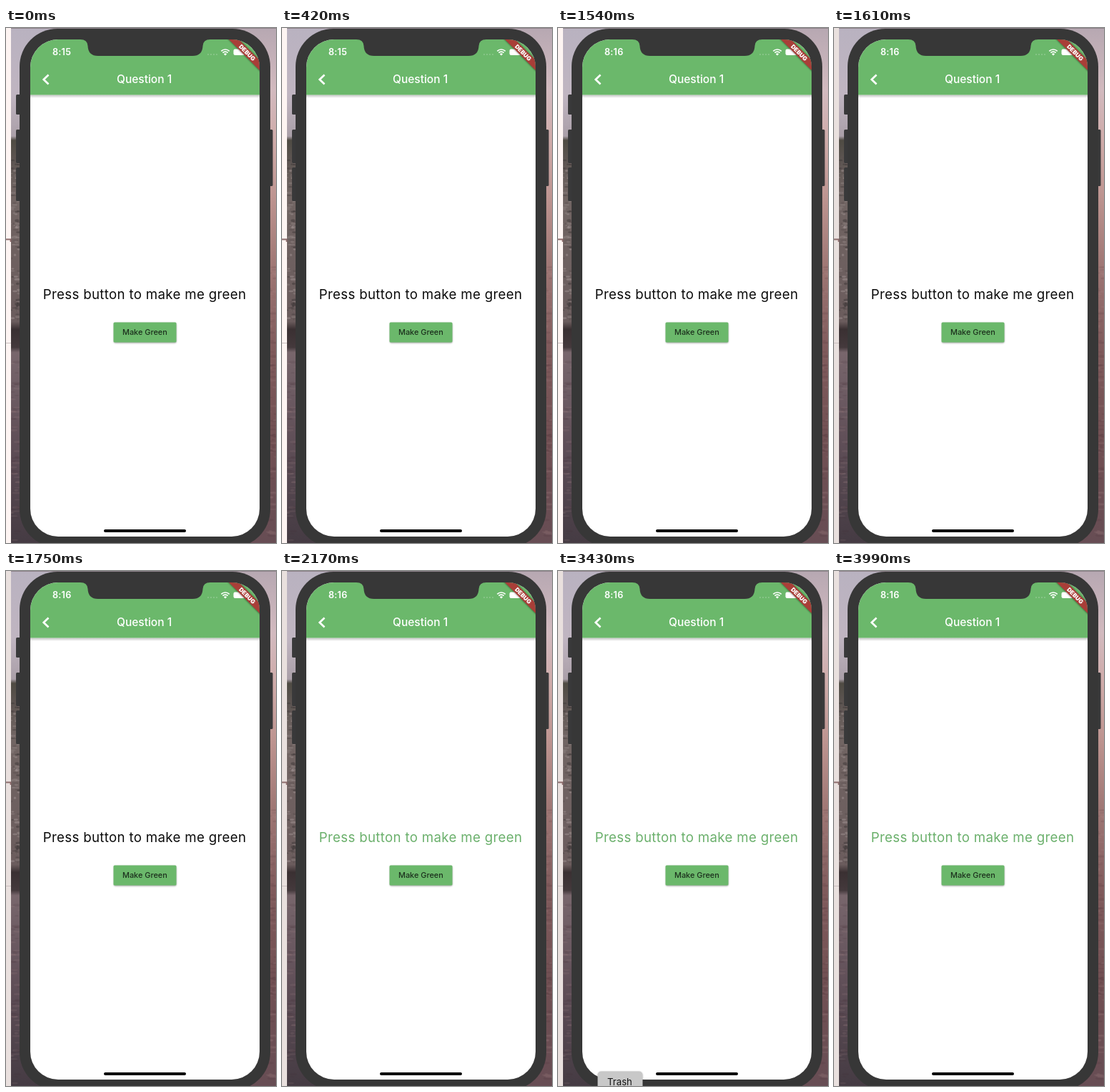
Write an HTML page that moves like this. It is 378 px wide and 720 px high and loops after 4060 ms.

```html
<!DOCTYPE html>
<html lang="en">
<head>
<meta charset="utf-8">
<title>Question 1</title>
<style>
html, body { margin: 0; width: 100%; height: 100%; overflow: hidden; background: #383838; }
svg { display: block; width: 378px; height: 720px; }
text { font-family: Inter, "Open Sans", sans-serif; }
</style>
</head>
<body>
<svg viewBox="0 0 378 720">
  <defs>
    <linearGradient id="leftSide" x2="0" y2="1">
      <stop offset="0" stop-color="#b9b2c0"/>
      <stop offset=".13" stop-color="#c0b5c1"/>
      <stop offset=".21" stop-color="#aa9fa8"/>
      <stop offset=".218" stop-color="#4f4b43"/>
      <stop offset=".25" stop-color="#5b5450"/>
      <stop offset=".32" stop-color="#716563"/>
      <stop offset=".57" stop-color="#6b5c5d"/>
      <stop offset=".585" stop-color="#3a3032"/>
      <stop offset=".62" stop-color="#44393c"/>
      <stop offset=".63" stop-color="#78666c"/>
      <stop offset=".8" stop-color="#604f58"/>
      <stop offset="1" stop-color="#453b43"/>
    </linearGradient>
    <linearGradient id="rightSide" x2="0" y2="1">
      <stop offset="0" stop-color="#b7a8b2"/>
      <stop offset=".12" stop-color="#d2babf"/>
      <stop offset=".22" stop-color="#cfaba9"/>
      <stop offset=".33" stop-color="#bd9490"/>
      <stop offset=".45" stop-color="#a27a77"/>
      <stop offset=".62" stop-color="#805b5c"/>
      <stop offset=".8" stop-color="#715053"/>
      <stop offset="1" stop-color="#674d54"/>
    </linearGradient>
    <linearGradient id="barShadow" x2="0" y2="1">
      <stop offset="0" stop-color="#000" stop-opacity=".24"/>
      <stop offset="1" stop-color="#000" stop-opacity="0"/>
    </linearGradient>
    <filter id="soft" x="-20%" y="-40%" width="140%" height="180%">
      <feGaussianBlur stdDeviation=".9"/>
    </filter>
    <clipPath id="screen"><rect x="34" y="16" width="321" height="695" rx="39"/></clipPath>
  </defs>

  <!-- desktop -->
  <rect width="200" height="720" fill="url(#leftSide)"/>
  <rect x="200" width="178" height="720" fill="url(#rightSide)"/>
  <g id="texture"></g>
  <rect width="378" height="1" fill="#8e828a"/>
  <rect id="panel" width="7" height="720"/>
  <path d="M0 295.5H6.5V299" fill="none" stroke="#8d6c6c" stroke-width="1.8"/>
  <path d="M0 440.5H7" stroke="#c9bfbf"/>

  <!-- phone -->
  <g fill="#39393a">
    <rect x="14" y="93" width="8" height="28" rx="1.5"/>
    <rect x="14" y="142" width="8" height="47" rx="1.5"/>
    <rect x="14" y="195" width="8" height="47" rx="1.5"/>
    <rect x="366" y="142" width="7.5" height="79" rx="1.5"/>
  </g>
  <rect x="19" y="1" width="351" height="725" rx="53" fill="#373737"/>
  <g clip-path="url(#screen)">
    <rect x="34" y="16" width="321" height="695" fill="#fff"/>
    <rect x="34" y="93.5" width="321" height="4.5" fill="url(#barShadow)"/>
    <rect x="34" y="16" width="321" height="77.5" fill="#6bb86b"/>
    <g fill="#fff">
      <text id="clock" x="65" y="38" font-size="12.7" font-weight="600" letter-spacing=".2"></text>
      <g opacity=".4">
        <circle cx="283" cy="37" r=".8"/><circle cx="287" cy="37" r=".8"/>
        <circle cx="291" cy="37" r=".8"/><circle cx="295" cy="37" r=".8"/>
      </g>
      <path d="M307 38.6L304.9 36.4A3 3 0 0 1 309.1 36.4Z"/>
      <rect x="318.5" y="29.5" width="16" height="8.5" rx="2.2"/>
    </g>
    <g fill="none" stroke="#fff" stroke-width="1.6">
      <path d="M303.4 34.6A5.1 5.1 0 0 1 310.6 34.6"/>
      <path d="M301.3 32.4A8.1 8.1 0 0 1 312.7 32.4"/>
      <path d="M59.5 65.5L52.7 72L59.5 78.5" stroke-width="2.7"/>
    </g>
    <text x="155" y="77" font-size="15.5" font-weight="500" fill="#fff">Question 1</text>
    <g transform="translate(355 16) rotate(45)">
      <rect x="-50" y="20.4" width="100" height="10.4" fill="#000" opacity=".5" filter="url(#soft)"/>
      <rect x="-50" y="20.4" width="100" height="10" fill="#a93e38"/>
      <text x="0.7" y="28.3" font-size="8.2" font-weight="900" text-anchor="middle" fill="#fff">DEBUG</text>
    </g>
    <text id="prompt" x="51.7" y="379" font-size="18.7" letter-spacing=".32">Press button to make me green</text>
    <rect x="151" y="412.5" width="87.5" height="28" rx="2" fill="#000" opacity=".36" filter="url(#soft)"/>
    <rect x="150.5" y="411.5" width="88" height="28" rx="1.5" fill="#6bb86b"/>
    <text x="163" y="429.3" font-size="10.9" font-weight="500" fill="#1c301d">Make Green</text>
    <rect x="137" y="701" width="115" height="4" rx="2"/>
  </g>
  <path d="M104 15H286V16Q276 16 275.5 25Q275 39 261 39H129Q115 39 114.5 25Q114 16 104 16Z" fill="#373737"/>

  <g id="tip">
    <rect x="55.5" y="700" width="63" height="30" rx="5" fill="#000" opacity=".25" filter="url(#soft)"/>
    <rect x="55.5" y="699.5" width="63" height="30" rx="5" fill="#c8c8c8"/>
    <text x="69" y="718.5" font-size="13.2" fill="#161616">Trash</text>
  </g>
</svg>
<script>
const LOOP = 4060;
const el = id => document.getElementById(id);

let seed = 7;
const rand = () => (seed = seed * 16807 % 2147483647) / 2147483647;

// Scatters flat blobs over a strip of the desktop.
function scatter(count, x, y, w, h, size, tones, opacity) {
  let out = "";
  for (let i = 0; i < count; i++) {
    const cx = x + rand() * w, cy = y + rand() * h;
    const rx = size * (.4 + rand()), ry = .6 + rand() * 1.3;
    out += `<ellipse cx="${cx}" cy="${cy}" rx="${rx}" ry="${ry}" fill="${tones[i % tones.length]}" opacity="${opacity}"/>`;
  }
  return out;
}

function drawTexture() {
  const ripple = ["#3f2c33", "#b49498"];
  el("texture").innerHTML =
    scatter(110, 7, 178, 12, 235, 3, ["#3e3837", "#8d8280", "#5b504f", "#a09292"], .5) +
    scatter(60, 7, 455, 12, 265, 5, ripple, .12) +
    scatter(90, 368, 330, 10, 390, 5, ripple, .12);
}

function render(t) {
  el("clock").textContent = t < 1400 ? "8:15" : "8:16";
  el("panel").setAttribute("fill", t < 1610 ? "#fdf4f2" : "#e9e0de");
  el("prompt").setAttribute("fill", t < 2100 ? "#0c0c0c" : "#6bb06c");
  el("tip").setAttribute("visibility", t >= 3360 && t < 3640 ? "visible" : "hidden");
}

function tick(now) {
  render(now % LOOP);
  requestAnimationFrame(tick);
}

drawTexture();
render(0);
requestAnimationFrame(tick);
</script>
</body>
</html>
```
